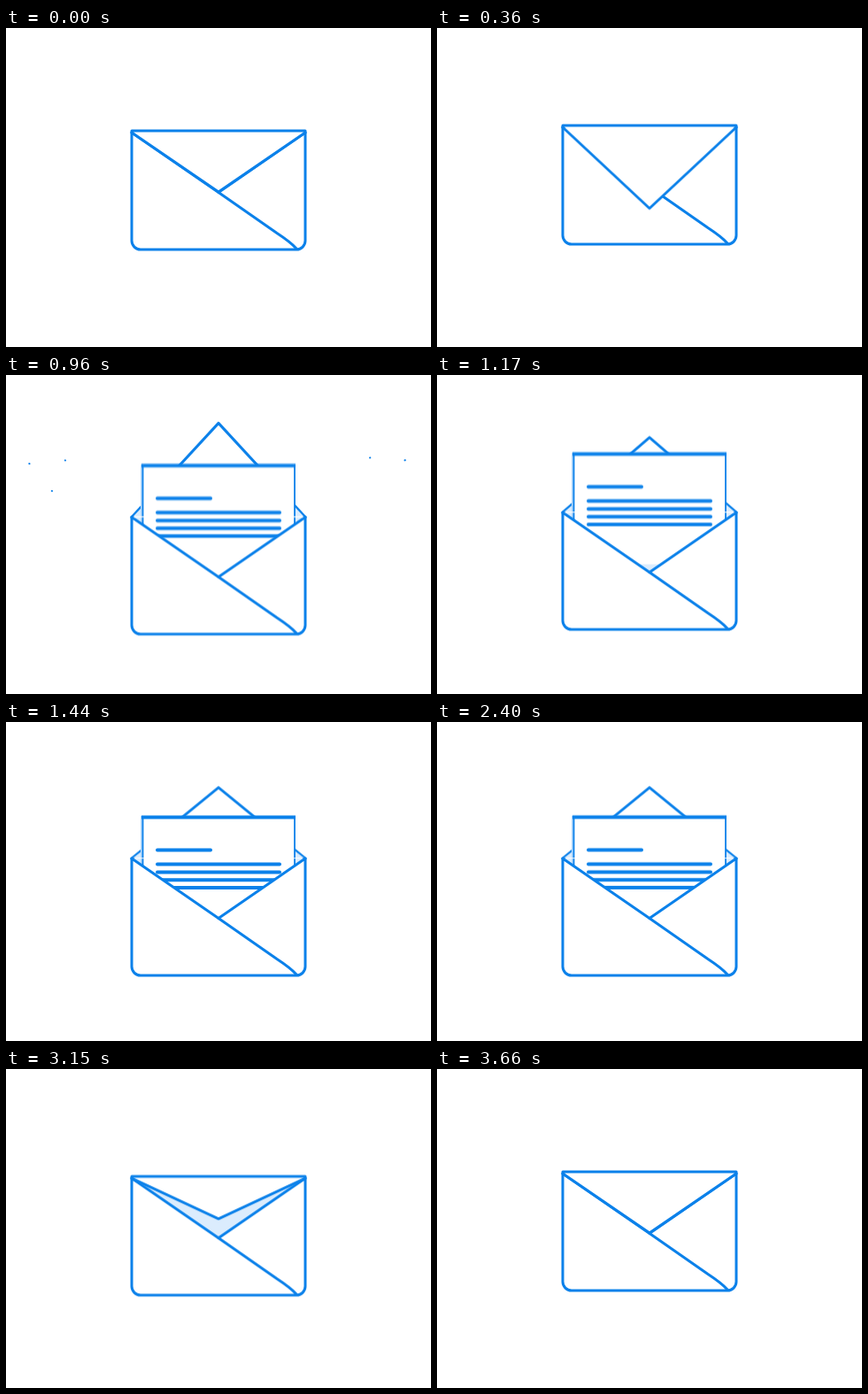
Write an HTML page without scripts that moves like this. It is 480 px wide and 360 px high and loops after 4140 ms.

```html
<!DOCTYPE html>
<html lang="en">
<head>
<meta charset="utf-8">
<title>Envelope</title>
<style>
  :root {
    --blue: #0b81ea;
    --light: #dbecfd;
    --back: cubic-bezier(.68, -.9, .32, 1.9);
  }
  html, body { margin: 0; width: 100%; height: 100%; overflow: hidden; background: #fff; }
  svg { display: block; width: 480px; height: 360px; }
  .line { fill: none; stroke: var(--blue); stroke-width: 3; stroke-linecap: round; stroke-linejoin: round; }
  .light { fill: var(--light); }

  .env, .letter, .flap, .inside, .hinge, .spark { animation: 4140ms linear infinite; }
  .env { animation-name: drop; animation-timing-function: var(--back); }
  .letter { animation-name: rise; animation-timing-function: var(--back); }
  .flap { animation-name: turn; animation-timing-function: var(--back); transform-origin: 0 0; }
  .flap path { vector-effect: non-scaling-stroke; }
  .inside { animation-name: inside; }
  .hinge { animation-name: hinge; }
  .spark { animation-name: spark; opacity: 0; }
  .early { animation: early 4140ms step-end infinite; }

  @keyframes drop {
    0%, .72% { transform: translateY(0); }
    28.99%, 60.63% { transform: translateY(36px); }
    87.92%, 100% { transform: translateY(0); }
  }
  @keyframes turn {
    0%, .72% { transform: scaleY(1); }
    28.99%, 60.63% { transform: scaleY(-1.194); }
    87.92%, 100% { transform: scaleY(1); }
  }
  @keyframes rise {
    0%, 4.76% { transform: translateY(120px); }
    33.02%, 57.97% { transform: translateY(0); }
    85.31%, 100% { transform: translateY(120px); }
  }
  @keyframes inside {
    0%, 14.6% { fill: #dbecfd; stroke-opacity: 0; }
    15.3% { fill: #dbecfd; stroke-opacity: .2; }
    16.6%, 73.4% { fill: #fff; stroke-opacity: 1; }
    74.5%, 100% { fill: #dbecfd; stroke-opacity: 0; }
  }
  @keyframes hinge {
    0%, 14.25% { opacity: 1; }
    15.2% { opacity: .5; }
    16.4%, 73.2% { opacity: 0; }
    74.9%, 100% { opacity: 1; }
  }
  @keyframes spark {
    0%, 13.76% { opacity: 0; stroke-dashoffset: 0; stroke-dasharray: .085 2; stroke-width: 3; }
    13.77% {
      opacity: 1; stroke-dashoffset: 0; stroke-dasharray: .085 2; stroke-width: 3;
      animation-timing-function: cubic-bezier(.333, .667, .667, 1);
    }
    23.7% { opacity: 1; stroke-dashoffset: -.985; stroke-dasharray: .002 2; stroke-width: 2; }
    23.71%, 100% { opacity: 0; stroke-dashoffset: -.985; stroke-dasharray: .002 2; stroke-width: 2; }
  }
  @keyframes early {
    0% { opacity: 1; }
    22.4%, 100% { opacity: 0; }
  }
</style>
</head>
<body>
<svg viewBox="0 0 480 360">
  <defs>
    <clipPath id="pocket"><rect width="480" height="288" y="-40"/></clipPath>
    <clipPath id="below"><rect width="480" height="243" y="117"/></clipPath>
  </defs>

  <!-- sparks -->
  <g class="line">
    <path class="spark" pathLength="1" d="M172 164L24 99"/>
    <path class="spark" pathLength="1" d="M170 164Q110 158 50 130"/>
    <path class="spark" pathLength="1" d="M180 175L65 95"/>
    <path class="spark" pathLength="1" d="M308 166L453 95"/>
    <path class="spark" pathLength="1" d="M300 172L413 92"/>
    <g class="early"><path class="spark" pathLength="1" d="M310 161Q370 157 430 128"/></g>
  </g>

  <g class="env">
    <!-- flap seen from inside, then the pocket -->
    <g transform="translate(0 118)">
      <g class="flap">
        <path class="line inside" d="M142 0L240 67L338 0"/>
        <path class="light" d="M143 0L158 10V0ZM337 0L322 10V0Z"/>
        <path class="line inside" style="fill:none;animation-name:none;stroke-opacity:0" d="M142 0L240 67L338 0"/>
      </g>
    </g>
    <path class="light" d="M142 118H338L240 185Z"/>

    <g clip-path="url(#pocket)">
      <g class="letter">
        <rect x="154" y="71" width="172" height="125" fill="#fff"/>
        <path d="M153 70V196" stroke="#b5d9fa" stroke-width="2"/>
        <path class="line" style="stroke-width:1.8" d="M154.5 71V196M326 71V196"/>
        <path class="line" style="stroke-width:4;stroke-linecap:butt" d="M153 71.5H327"/>
        <path class="line" style="stroke-width:4" d="M171 108.5H231M171 124.5H309M171 133.5H309M171 142.3H309M171 151H309"/>
      </g>
    </g>

    <!-- front -->
    <path class="line" style="fill:#fff" d="M142 118V240A10 10 0 0 0 152 250H328A10 10 0 0 0 338 240V118L240 185.5Z"/>
    <path class="line" d="M240 185.5L306 231.5Q322 242 328 249"/>
    <g clip-path="url(#below)">
      <g transform="translate(0 118)">
        <g class="flap"><path class="line" style="fill:#fff" d="M142 0L240 67L338 0"/></g>
      </g>
    </g>
    <path class="line hinge" d="M142 118V116H338V118"/>
  </g>
</svg>
</body>
</html>
```
